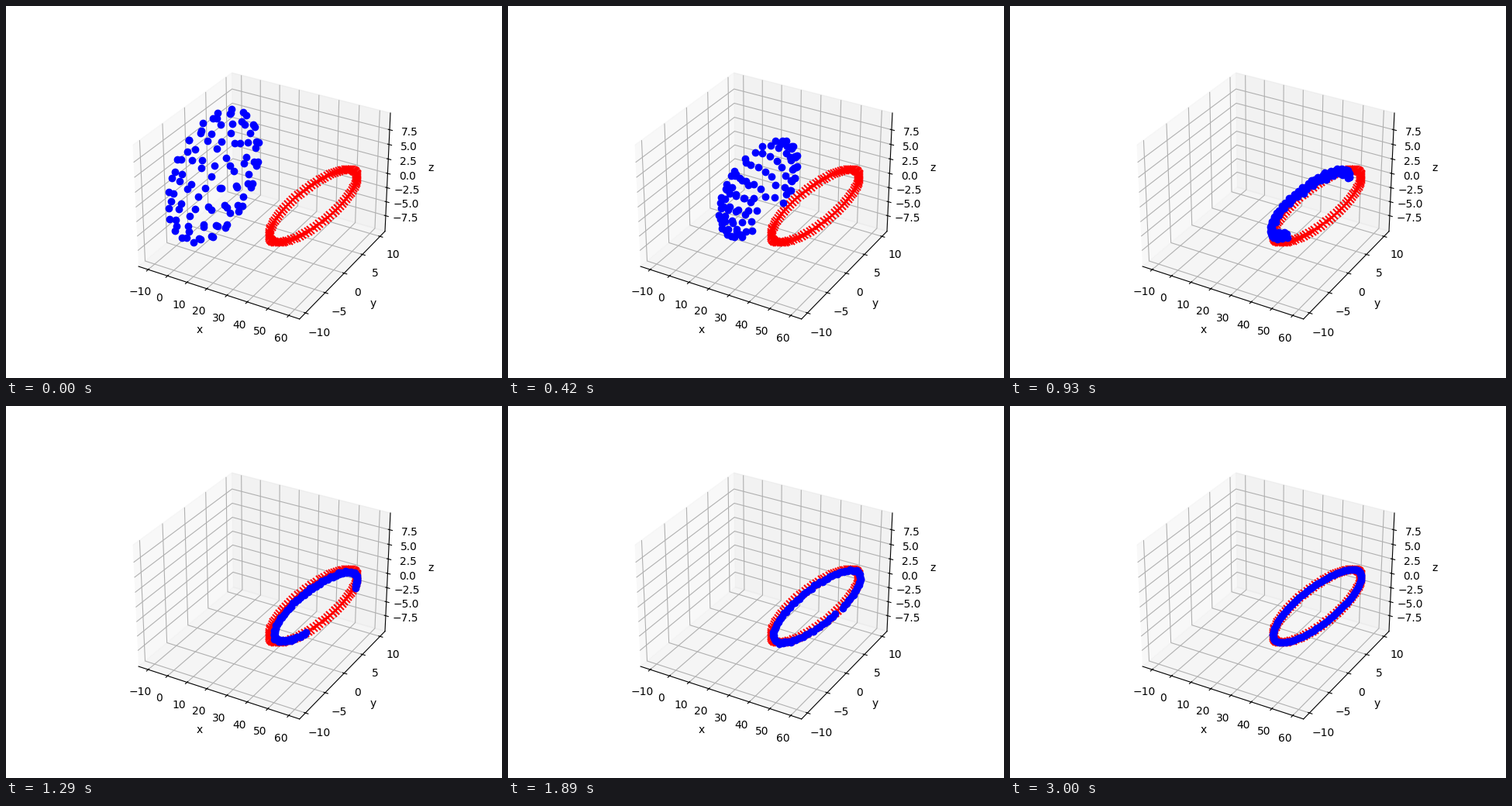
Recreate the animation shown at these times as a matplotlib script. Size 640x480 px, loop 3030 ms.

```python
import numpy as np
import matplotlib.pyplot as plt
from matplotlib.animation import FuncAnimation

FRAMES, INTERVAL = 101, 30
N, RADIUS, CENTER = 100, 10.0, 50.0
GOLDEN_ANGLE = np.pi * (3 - np.sqrt(5))


def fibonacci_sphere():
    """Evenly spread points on a sphere around the origin."""
    theta = GOLDEN_ANGLE * np.arange(N)
    z = np.linspace(1 - 1 / N, 1 / N - 1, N)
    r = np.sqrt(1 - z**2)
    return RADIUS * np.array([r * np.cos(theta), r * np.sin(theta), z])


def ring(angle, radius=RADIUS):
    return np.array([CENTER + radius * np.cos(angle),
                     radius * np.sin(angle),
                     np.zeros_like(angle)])


def spring(t, freq=0.097, damping=0.75):
    """Step response of a damped spring, from 0 to 1."""
    root = np.sqrt(1 - damping**2)
    swing = freq * root * t
    decay = np.exp(-damping * freq * t)
    return 1 - decay * (np.cos(swing) + damping / root * np.sin(swing))


def smooth(t, start, length):
    u = np.clip((t - start) / length, 0, 1)
    return u * u * (3 - 2 * u)


def limits(values, margin):
    """Data range with a margin, plus the small gap to the box walls."""
    low, high = values.min(), values.max()
    span = (high - low) * (1 + 2 * margin)
    pad = (high - low) * margin + span / 48
    return low - pad, high + pad


start = fibonacci_sphere()
target = ring(np.linspace(0, 2 * np.pi, N))

# Spread the points evenly along the ring, ordered by their azimuth;
# offsets are measured from the near side of the ring.
azimuth = np.arctan2(start[1], start[0]) % (2 * np.pi)
rank = np.argsort(np.argsort(azimuth))
offset = (rank + 0.5) / N * 2 * np.pi - np.pi


def cloud_at(t):
    """The cloud flies to the near arc, which then closes into a full ring."""
    spread = 0.55 + 0.45 * smooth(t, 16, 54)
    radius = RADIUS * (0.92 + 0.08 * smooth(t, 30, 45))
    goal = ring(np.pi + spread * offset, radius)
    return start + (goal - start) * spring(t)


fig = plt.figure(figsize=(6.4, 4.8), dpi=100)
ax = fig.add_subplot(projection="3d")
ax.plot(*target, "x", color="#ff0000", markersize=7, markeredgewidth=1.5)
cloud, = ax.plot(*start, "o", color="#0000ff")

x, y, z = np.hstack([start, target])
ax.set(xlim=limits(x, 0.05), ylim=limits(y, 0.05), zlim=limits(z, 0),
       xlabel="x", ylabel="y", zlabel="z")
ax.set_xticks(np.arange(-10, 61, 10))
ax.set_yticks(np.arange(-10, 11, 5))
ax.set_zticks(np.arange(-7.5, 7.6, 2.5))


def update(frame):
    cloud.set_data_3d(*cloud_at(frame))
    return cloud,


anim = FuncAnimation(fig, update, frames=FRAMES, interval=INTERVAL,
                     repeat=True, repeat_delay=0)
plt.show()
```
